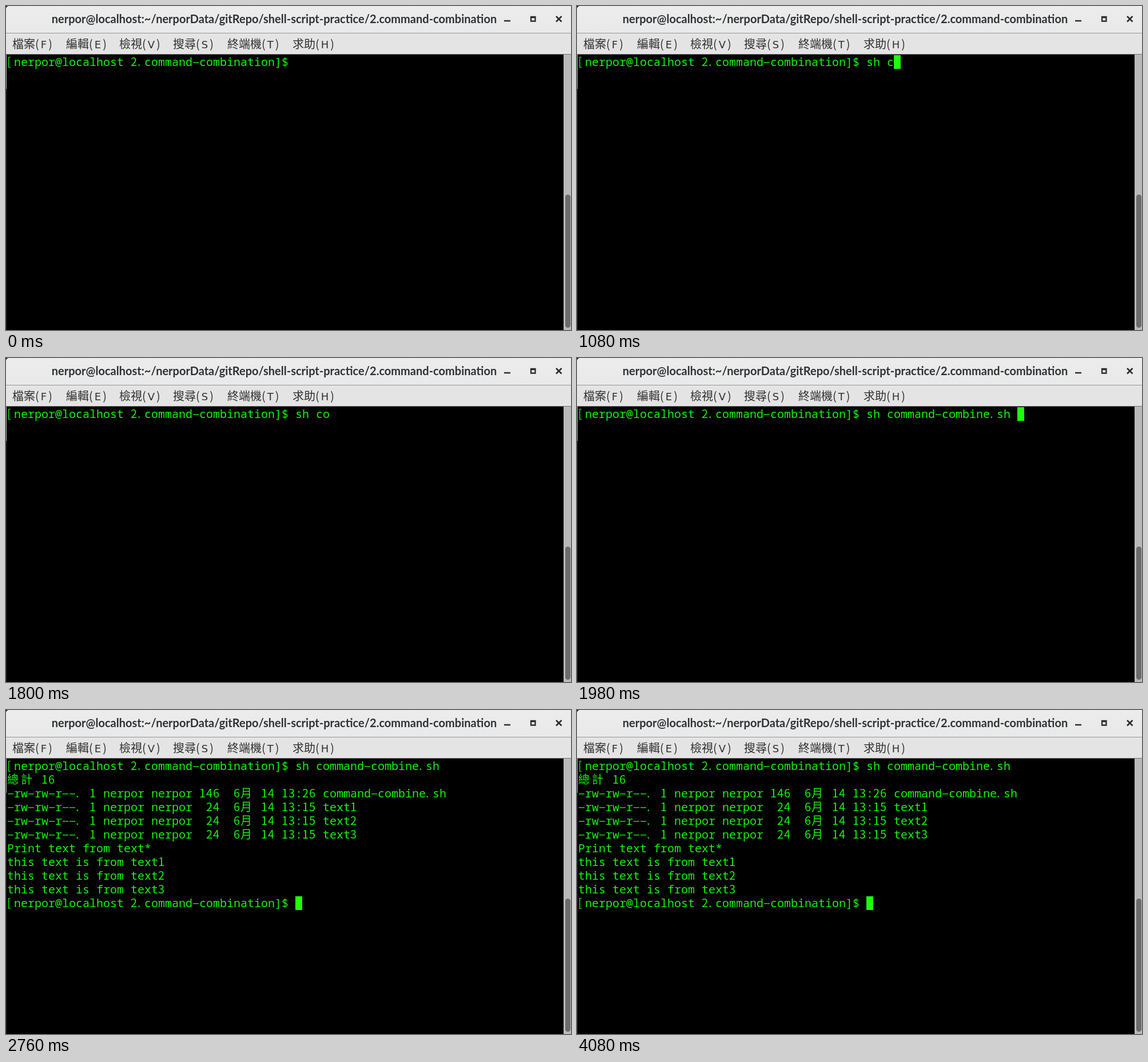
These frames come from a looping animation (988x567 px, 4.14 s). An HTML page:

```html
<!DOCTYPE html>
<html lang="zh-Hant">
<head>
<meta charset="utf-8">
<title>Terminal</title>
<style>
  html, body { margin: 0; width: 100%; height: 100%; overflow: hidden; background: #000; }
  #stage { position: relative; width: 988px; height: 567px; overflow: hidden; background: #000; }
  #stage > * { position: absolute; }
  .edge { left: 0; top: 85px; width: 1px; height: 482px; background: linear-gradient(#b4b4b4 60px, #242424 60px); }

  .title {
    left: 0; top: 0; width: 988px; height: 47px;
    background: linear-gradient(#ececec, #e9e9e9); border-bottom: 1px solid #969696;
    border-radius: 5px 0 0 0;
  }
  .title b {
    position: absolute; left: 0; top: 0; width: 938px; text-align: center; white-space: pre;
    font: 700 20px/45px Lato, sans-serif; color: #2e3234;
  }
  .title svg { position: absolute; left: 0; top: 0; }

  .menu { left: 0; top: 48px; width: 988px; height: 36px; background: #e4e4e4; border-bottom: 1px solid #707070; }
  .menu span {
    position: absolute; top: 0; white-space: pre; color: #303030;
    font: 20px/35px "Noto Sans CJK TC", "Noto Sans CJK", sans-serif;
  }
  .menu i { font-style: normal; letter-spacing: 3px; }
  .menu u { font: 18px "DejaVu Sans", sans-serif; text-decoration: none; }

  .track { left: 975px; top: 85px; width: 13px; height: 482px; background: #b9b9b9; }
  .thumb { left: 978px; top: 330px; width: 9px; height: 233px; border-radius: 5px; background: #6c6c6c; }

  .row {
    left: 2px; height: 24px; white-space: pre; color: #14f50a;
    font: 20px/24px "Noto Sans Mono", "DejaVu Sans Mono", monospace;
  }
  .row span { display: inline-block; width: 12px; }
  .row .n, .row .w { line-height: 0; font-family: "Noto Sans CJK TC", "Noto Sans CJK", sans-serif; font-weight: 300; }
  .row .w { width: 24px; }
  .row .h { color: transparent; background: linear-gradient(#12dc0a, #12dc0a) 1px 12px / 10px 1.5px no-repeat; }

  #cmd { left: 506px; overflow: hidden; animation: type 4140ms step-end infinite; }
  #out { left: 0; top: 0; animation: show 4140ms step-end infinite; }
  #out .row { position: absolute; }
  #cursor {
    left: 505.8px; top: 86px; width: 11.8px; height: 24px; background: #1eff0a;
    animation: move 4140ms step-end infinite, blink 4140ms step-end infinite;
  }

  @keyframes type {
    0% { width: 0; }
    4.34% { width: 12px; }
    7.24% { width: 24px; }
    13.04% { width: 36px; }
    26.08% { width: 48px; }
    28.98% { width: 60px; }
    44.92%, 100% { width: 264px; }
  }
  @keyframes move {
    0% { transform: none; }
    4.34% { transform: translateX(12px); }
    7.24% { transform: translateX(24px); }
    13.04% { transform: translateX(36px); }
    26.08% { transform: translateX(48px); }
    28.98% { transform: translateX(60px); }
    44.92% { transform: translateX(264px); }
    66.66%, 100% { transform: translateY(240px); }
  }
  @keyframes blink {
    0%, 43.47%, 59.41%, 79.7% { opacity: 0; }
    4.34%, 44.92%, 65.21%, 94.2%, 100% { opacity: 1; }
  }
  @keyframes show {
    0% { visibility: hidden; }
    66.66%, 100% { visibility: visible; }
  }
</style>
</head>
<body>
<div id="stage">
  <div class="edge"></div>
  <div class="title">
    <b>nerpor@localhost:~/nerporData/gitRepo/shell-script-practice/2.command-combination</b>
    <svg width="988" height="47" fill="none" stroke="#2a2e30">
      <path d="M871 26h11" stroke-width="2.5"/>
      <path d="M918 19h7.5v7.5h-7.5zM917 20h9.5" stroke-width="2.3"/>
      <path d="M962 18l9.5 9.5M971.5 18l-9.5 9.5" stroke-width="2.6"/>
    </svg>
  </div>
  <div class="menu" id="menu"></div>
  <div class="track"></div>
  <div class="thumb"></div>
  <div id="cursor"></div>
  <div id="cmd" class="row"></div>
  <div id="out"></div>
</div>
<script>
  const $ = id => document.getElementById(id);
  const user = "nerpor";
  const prompt = `[${user}@localhost 2.command-combination]$ `;
  const file = (size, time, name) => `-rw-rw-r--. 1 ${user} ${user} ${size}  6月 14 ${time} ${name}`;
  const texts = [1, 2, 3].map(n => "text" + n);

  // Keep every glyph on the 12px terminal grid.
  const cells = s => s
    .replace(/[0-9[.]|-|[^\x00-\x7f]/g, c =>
      `<span class="${c === "-" ? "h" : c > "\x7f" ? "w" : "n"}">${c}</span>`);

  const row = (s, i) => `<div class="row" style="top:${86 + 24 * i}px">${cells(s)}</div>`;

  const output = [
    "總計 16",
    file("146", "13:26", "command-combine.sh"),
    ...texts.map(t => file(" 24", "13:15", t)),
    "Print text from text*",
    ...texts.map(t => "this text is from " + t),
    prompt
  ];

  $("cmd").style.top = "86px";
  $("cmd").innerHTML = cells("sh command-combine.sh ");
  $("out").innerHTML = output.map((s, i) => row(s, i + 1)).join("");
  $("cmd").insertAdjacentHTML("beforebegin", row(prompt, 0));

  $("menu").innerHTML = [
    [11, "檔案", "F"], [105, "編輯", "E"], [198, "檢視", "V"],
    [292, "搜尋", "S"], [387, "終端機", "T"], [501, "求助", "H"]
  ].map(([x, label, key]) => `<span style="left:${x}px">${label}<i>(<u>${key}</u>)</i></span>`).join("");
</script>
</body>
</html>
```
